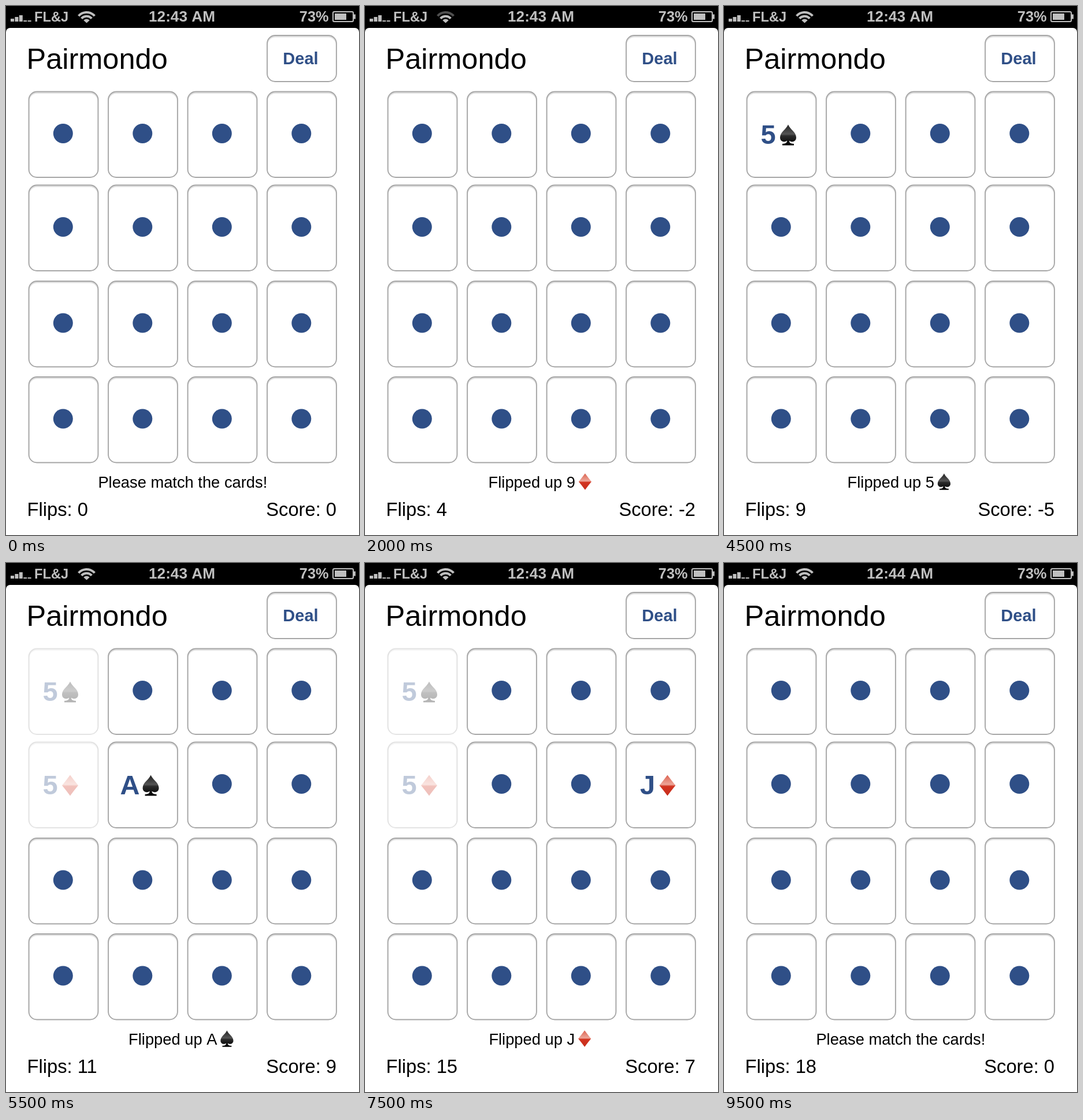
Recreate the animation shown at these times as an HTML page with a canvas. Size 611 px wide and 917 px high, loop 10 s.

```html
<!DOCTYPE html>
<html lang="en">
<head>
<meta charset="utf-8">
<title>Card matching game</title>
<style>
html, body { margin: 0; width: 100%; height: 100%; overflow: hidden; background: #000; }
canvas { display: block; }
</style>
</head>
<body>
<canvas id="stage" width="611" height="917"></canvas>
<script>
const ctx = document.getElementById('stage').getContext('2d');
const LOOP = 10000, STEP = 500;
const BLUE = '#2f4f87', SILVER = '#bfbfbf';
const COLUMNS = [39.5, 177, 314.5, 452], ROWS = [148.5, 310.5, 477, 643];
const CARD_W = 120, CARD_H = 148.5;
const FACES = ['5♠', '4♦', '9♦', '8♠', '5♦', 'A♠', '7♥', 'J♦'];
const WELCOME = 'Please match the cards!';
const FIRST_MATCH = 'Matched 5♦ and 5♠ for 16 points!';
const SECOND_MATCH = 'Matched 4♦ and J♦ for 4 points!';

// One row per half second: flips, score, face-up card, message (default: last card turned up).
const TURNS = [
  [0, 0, null, WELCOME],
  [1, -1, 3], [2, -1], [3, -2, 2], [4, -2], [5, -3, 1], [6, -3],
  [7, -4, 0], [8, -4], [9, -5, 0],
  [10, 10, null, FIRST_MATCH],
  [11, 9, 5], [12, 9], [13, 8, 6], [14, 8], [15, 7, 7],
  [18, 9, null, SECOND_MATCH], [18, 9, null, SECOND_MATCH], [18, 9, null, SECOND_MATCH],
  [18, 0, null, WELCOME]
];
let lastMessage;
const STATES = TURNS.map(([flips, score, up, message], step) => {
  if (message) lastMessage = message;
  else if (up !== undefined) lastMessage = 'Flipped up ' + FACES[up];
  const dealt = step === 19;
  const matched = dealt ? [] : [...(step >= 10 ? [0, 4] : []), ...(step >= 16 ? [1, 7] : [])];
  return {
    flips, score, up, matched,
    message: lastMessage,
    clock: step < 17 ? '12:43 AM' : '12:44 AM',
    pressed: step === 17 || step === 18,
    weakWifi: [3, 4, 7, 8, 12, 13].includes(step)
  };
});

// Suit outlines fit a box about 28 by 36, centred on the origin.
const RED_GLOSS = ['#dc6452', '#eda699', '#d23420', '#c62d1c'];
const SUITS = {
  '♠': {
    path: new Path2D('M0-18C3-10 14-5 14 4.5C14 12 6 13.5 2 10C2 14 4 15 10 15.5V18H-10V15.5C-4 15-2 14-2 10C-6 13.5-14 12-14 4.5C-14-5-3-10 0-18Z'),
    colors: ['#222', '#555', '#2c2c2c', '#000']
  },
  '♦': {
    path: new Path2D('M0-18Q7-8.5 14 0Q7 8.5 0 18Q-7 8.5-14 0Q-7-8.5 0-18Z'),
    colors: RED_GLOSS
  },
  '♥': {
    path: new Path2D('M0 16C-6 8-18 3-18-6C-18-17-4-18 0-9C4-18 18-17 18-6C18 3 6 8 0 16Z'),
    colors: RED_GLOSS
  }
};

function drawSuit(suit, x, y, scale = 1) {
  const { path, colors } = SUITS[suit];
  const shade = ctx.createLinearGradient(0, -18, 0, 18);
  [0, 0.46, 0.54, 1].forEach((stop, i) => shade.addColorStop(stop, colors[i]));
  ctx.save();
  ctx.translate(x, y);
  ctx.scale(scale, scale);
  ctx.fillStyle = shade;
  ctx.fill(path);
  ctx.restore();
}

function drawText(text, x, y, size, { color = '#000', weight = 'normal', align = 'left' } = {}) {
  ctx.font = `${weight} ${size}px "Liberation Sans", Arial, sans-serif`;
  ctx.textAlign = align;
  ctx.fillStyle = color;
  ctx.fillText(text, x, y);
}

function drawPanel(x, y, w, h, fill = '#fff') {
  const outline = new Path2D();
  outline.roundRect(x, y, w, h, 14);
  ctx.fillStyle = fill;
  ctx.fill(outline);
  if (fill === '#fff') {
    ctx.save();
    ctx.clip(outline);
    ctx.translate(0, 2);
    ctx.strokeStyle = '#dedede';
    ctx.lineWidth = 2.5;
    ctx.stroke(outline);
    ctx.restore();
  }
  ctx.strokeStyle = '#a6a6a6';
  ctx.lineWidth = 1.8;
  ctx.stroke(outline);
}

function drawCard(index, state) {
  const x = COLUMNS[index % 4], y = ROWS[Math.floor(index / 4)];
  const matched = state.matched.includes(index);
  const middle = x + CARD_W / 2;
  ctx.globalAlpha = matched ? 0.3 : 1;
  drawPanel(x, y, CARD_W, CARD_H);
  if (matched || state.up === index) {
    const [rank, suit] = FACES[index];
    const wide = rank === 'A';
    drawText(rank, middle - (wide ? 39.5 : 36), y + 90, 47, { color: BLUE, weight: 'bold' });
    drawSuit(suit, middle + (wide ? 13.6 : 11.5), y + 75);
  } else {
    ctx.fillStyle = BLUE;
    ctx.beginPath();
    ctx.arc(middle - 0.7, y + 72.5, 17, 0, 2 * Math.PI);
    ctx.fill();
  }
  ctx.globalAlpha = 1;
}

function drawMessage(message) {
  const size = message === FIRST_MATCH ? 26.2 : 27.3;
  const suitWidth = size * 1.25;
  const parts = message.split(/([♠♦♥])/);
  ctx.font = `${size}px "Liberation Sans", Arial, sans-serif`;
  const widths = parts.map(part => SUITS[part] ? suitWidth : ctx.measureText(part).width);
  let x = 305.8 - widths.reduce((sum, width) => sum + width, 0) / 2;
  parts.forEach((part, i) => {
    if (SUITS[part]) drawSuit(part, x + suitWidth / 2, 824.5, size / 34.5);
    else drawText(part, x, 835, size);
    x += widths[i];
  });
}

function drawWifi(weak) {
  const arc = (radius, width, color) => {
    ctx.strokeStyle = color;
    ctx.lineWidth = width;
    ctx.beginPath();
    ctx.arc(139.5, 29.5, radius, -Math.PI * 0.77, -Math.PI * 0.23);
    ctx.stroke();
  };
  arc(18.5, 4, weak ? '#505050' : SILVER);
  arc(11.8, 4, SILVER);
  arc(3.5, 7, SILVER);
}

function drawStatusBar(state) {
  const light = { color: SILVER, weight: 'bold' };
  ctx.fillStyle = SILVER;
  [5, 8, 11, 2, 2].forEach((height, i) => ctx.fillRect(8 + i * 7.4, 27 - height, 6, height));
  drawText('FL&J', 49, 27, 23.7, light);
  drawWifi(state.weakWifi);
  drawText(state.clock, 304.5, 27, 26.2, { ...light, align: 'center' });
  drawText('73%', 558.5, 27, 25.3, { ...light, align: 'right' });
  ctx.strokeStyle = SILVER;
  ctx.lineWidth = 2;
  ctx.beginPath();
  ctx.roundRect(566, 10, 35, 17, 2);
  ctx.stroke();
  ctx.fillRect(569, 13, 20, 11);
  ctx.fillRect(602, 14.5, 3, 8);
}

function draw(state) {
  ctx.fillStyle = '#000';
  ctx.fillRect(0, 0, 611, 917);
  drawStatusBar(state);
  ctx.fillStyle = '#fff';
  ctx.beginPath();
  ctx.roundRect(0, 38, 611, 879, [7, 7, 0, 0]);
  ctx.fill();

  drawText('Pairmondo', 35.5, 109, 50.5);
  drawPanel(452, 51, 120, 80, state.pressed ? '#4671bb' : '#fff');
  drawText('Deal', 510, 101, 29, { color: state.pressed ? '#fff' : BLUE, weight: 'bold', align: 'center' });
  for (let i = 0; i < 16; i++) drawCard(i, state);
  drawMessage(state.message);
  drawText('Flips: ' + state.flips, 36.5, 884, 32.7);
  drawText('Score: ' + state.score, 572, 884, 32.7, { align: 'right' });
}

const start = performance.now();
function tick() {
  const time = (performance.now() - start) % LOOP;
  draw(STATES[Math.floor(time / STEP)]);
  requestAnimationFrame(tick);
}
tick();
</script>
</body>
</html>
```
